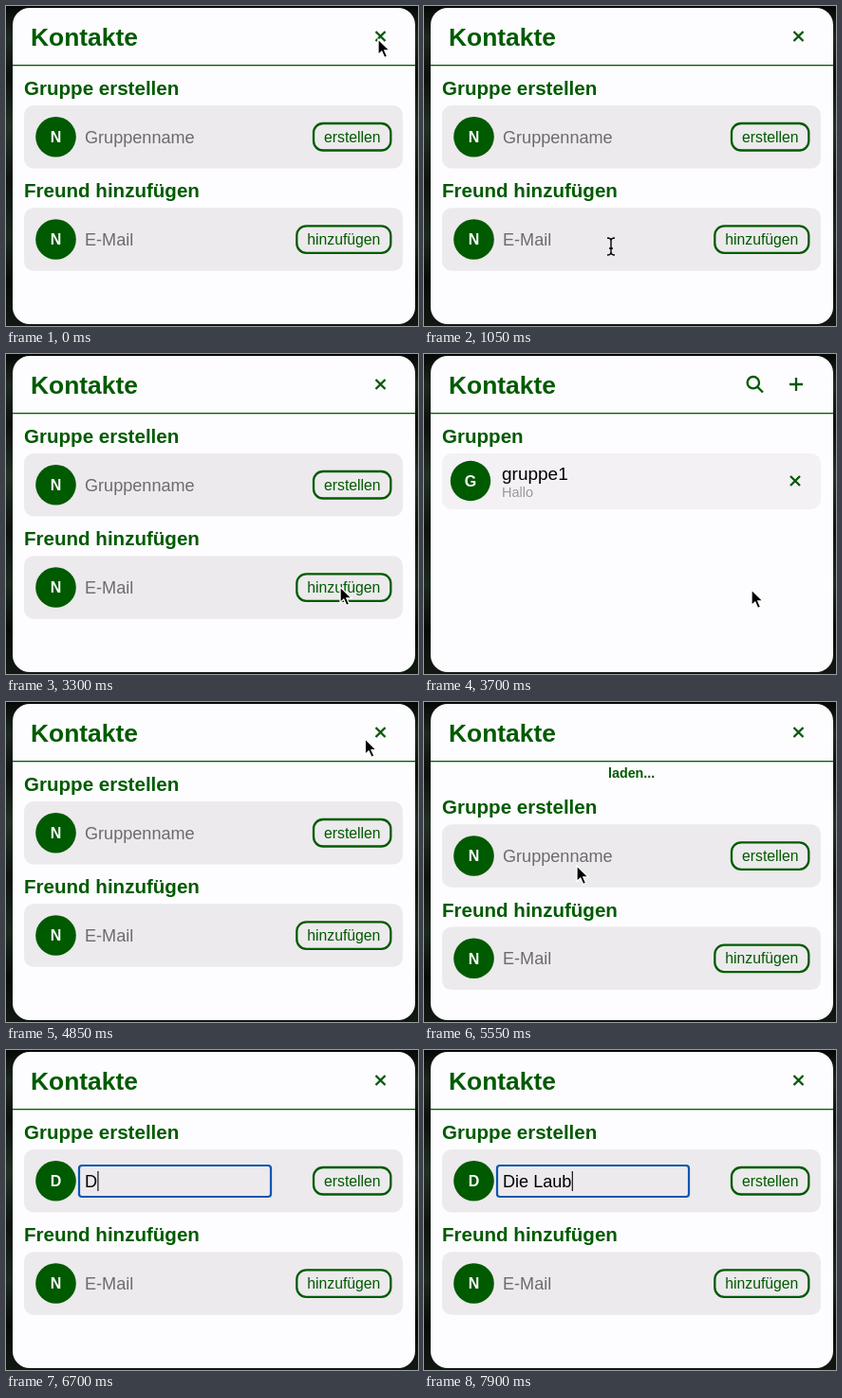
An HTML page for the animation above (8000 ms loop, 434 by 338 pixels).

```html
<!DOCTYPE html>
<html lang="de">
<head>
<meta charset="utf-8">
<title>Kontakte</title>
<style>
  html, body { margin: 0; width: 100%; height: 100%; overflow: hidden; background: #080d09; }
  svg { display: block; width: 434px; height: 338px; font-family: "Liberation Sans", Arial, sans-serif; }
  .green { fill: #005a00; }
  .bold { font-weight: bold; }
  .title { font-size: 26.4px; }
  .heading { font-size: 20.55px; }
  .field { font-size: 18.1px; }
  .label { font-size: 15.75px; }
  .initial { font-size: 16px; fill: #fff; text-anchor: middle; }
  .card { fill: #eceaec; }
  .line { fill: none; stroke: #005a00; stroke-width: 2.3; }
  .focus { fill: none; stroke: #0b56b3; stroke-width: 2.2; }
  .off { display: none; }
</style>
</head>
<body>
<svg viewBox="0 0 434 338">
  <defs>
    <linearGradient id="leaf" x2="0" y2="1">
      <stop offset="0" stop-color="#050806"/>
      <stop offset=".1" stop-color="#1d271f"/>
      <stop offset=".22" stop-color="#0a100b"/>
      <stop offset=".38" stop-color="#223024"/>
      <stop offset=".55" stop-color="#0c130d"/>
      <stop offset=".72" stop-color="#1b281d"/>
      <stop offset=".86" stop-color="#060a07"/>
      <stop offset="1" stop-color="#111912"/>
    </linearGradient>
    <path id="cross" class="line" d="M-5-5 5 5M5-5-5 5"/>
  </defs>

  <rect width="434" height="338" fill="url(#leaf)"/>
  <rect x="7" y="2" width="424" height="334" rx="18" fill="#fdfcfe"/>
  <text class="green bold title" x="26" y="41.5">Kontakte</text>
  <rect class="green" x="7" y="62" width="424" height="1.3"/>

  <g id="create">
    <use href="#cross" x="394.5" y="32"/>
    <text id="loading" class="green bold" x="194" y="80" font-size="14.3">laden...</text>
    <g id="forms"></g>
  </g>

  <g id="list">
    <circle class="line" cx="346.8" cy="30.2" r="6.2"/>
    <path class="line" d="M351.3 34.7 357 40.5M385 32h14M392 25v14"/>
    <text class="green bold heading" x="19" y="94">Gruppen</text>
    <rect x="19" y="105" width="399" height="59" rx="10" fill="#f3f1f4"/>
    <circle class="green" cx="49" cy="134" r="21.2"/>
    <text class="bold initial" x="49" y="140">G</text>
    <text x="82" y="133" font-size="19">gruppe1</text>
    <text x="82" y="151" font-size="14.5" fill="#999">Hallo</text>
    <use href="#cross" x="391" y="134"/>
  </g>

  <g id="pointer">
    <path id="arrow" d="M0 0V16.5L3.8 13 6.6 19.5 9.6 18.2 6.8 11.9H12Z" fill="#000" stroke="#fff" stroke-width="1.3"/>
    <path id="beam" d="M-4-9Q0-9 0-6Q0-9 4-9M0-6V6M-4 9Q0 9 0 6Q0 9 4 9M-2 2H2" fill="none" stroke="#000" stroke-width="1.4"/>
  </g>
</svg>
<script>
const LOOP = 8000, STEP = 50;
const $ = id => document.getElementById(id);
const show = (el, on) => el.classList.toggle('off', !on);
const within = (t, from, to) => t >= from && t < to;

const forms = [
  { y: 0, heading: 'Gruppe erstellen', hint: 'Gruppenname', button: 'erstellen', left: 324,
    text: 'Die Laub', focus: [6150, LOOP], keys: [6500, 6850, 7000, 7150, 7350, 7550, 7700, 7850] },
  { y: 108.3, heading: 'Freund hinzufügen', hint: 'E-Mail', button: 'hinzufügen', left: 306.3,
    text: 'a@', focus: [1250, 3200], keys: [1600, 1800] }
];

$('forms').innerHTML = forms.map(f => `
  <g transform="translate(0 ${f.y})">
    <text class="green bold heading" x="19" y="94">${f.heading}</text>
    <rect class="card" x="19" y="105" width="399" height="66.5" rx="10"/>
    <circle class="green" cx="52.5" cy="138.2" r="21.3"/>
    <text class="bold initial" data-part="initial" x="52.5" y="144"></text>
    <rect class="focus" data-part="ring" x="77" y="122" width="202" height="33" rx="3"/>
    <text class="field" data-part="value" x="83" y="144.7"></text>
    <rect data-part="caret" y="128" width="1.1" height="21"/>
    <rect class="line" x="${f.left}" y="124" width="${405.3 - f.left}" height="28.5" rx="10"/>
    <text class="green label" x="${f.left + 11}" y="143.8">${f.button}</text>
  </g>`).join('');

forms.forEach((f, i) => {
  f.parts = {};
  $('forms').children[i].querySelectorAll('[data-part]')
    .forEach(el => f.parts[el.dataset.part] = el);
});

function drawForm(f, t) {
  const { initial, ring, value, caret } = f.parts;
  const focused = within(t, ...f.focus);
  const typed = focused ? f.keys.filter(k => k <= t).length : 0;
  const text = f.text.slice(0, typed);
  const since = t - (typed ? f.keys[typed - 1] : f.focus[0]);

  initial.textContent = typed ? text[0].toUpperCase() : 'N';
  value.textContent = text || f.hint;
  value.setAttribute('fill', typed ? '#000' : '#6d6b6d');
  show(ring, focused);
  show(caret, focused && since % 1000 < 500);
  caret.setAttribute('x', 83.3 + (typed ? value.getComputedTextLength() : 0));
}

// Time, x, y
const path = [
  [0, 392, 35], [350, 392, 35], [950, 197, 254], [2650, 197, 254],
  [3050, 352, 246], [3400, 352, 246], [3600, 345, 249], [3950, 345, 249],
  [4450, 391, 31], [4750, 391, 31], [5450, 161, 173], [5650, 161, 173],
  [5950, 165, 140], [LOOP, 165, 140]
];

function pointerAt(t) {
  const i = path.findIndex(p => p[0] > t);
  const [t0, x0, y0] = path[i - 1], [t1, x1, y1] = path[i];
  const u = (t - t0) / (t1 - t0), e = u * u * (3 - 2 * u);
  return [x0 + (x1 - x0) * e, y0 + (y1 - y0) * e];
}

function draw(t) {
  const listed = within(t, 3450, 4650);
  const loading = within(t, 4900, 5850);
  show($('list'), listed);
  show($('create'), !listed);
  show($('loading'), loading);
  $('forms').setAttribute('transform', `translate(0 ${loading ? 24.3 : 0})`);
  if (!listed) forms.forEach(f => drawForm(f, t));

  const [x, y] = pointerAt(t);
  const overField = !listed && within(x, 77, 280) &&
    forms.some(f => within(y - f.y, 122, 156));
  $('pointer').setAttribute('transform', `translate(${x} ${y})`);
  show($('pointer'), !within(t, 1600, 2650) && t < 6500);
  show($('arrow'), !overField);
  show($('beam'), overField);
}

const start = performance.now();
function tick() {
  const t = (performance.now() - start) % LOOP;
  draw(Math.floor(t / STEP) * STEP);
  requestAnimationFrame(tick);
}
draw(0);
requestAnimationFrame(tick);
</script>
</body>
</html>
```
